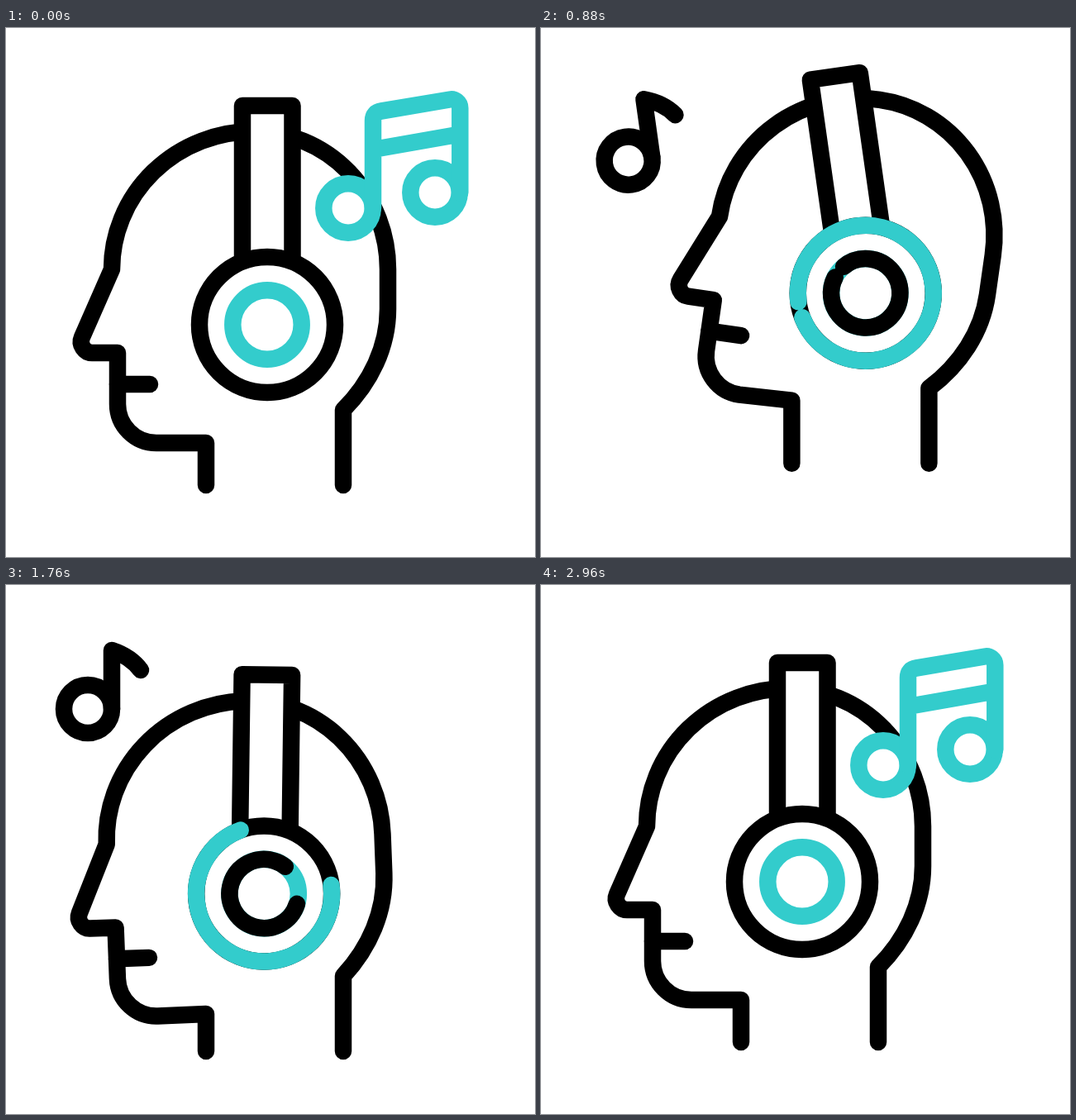
An HTML page with a canvas that plays this animation: 640 by 640 pixels, repeating every 3 s.

```html
<!DOCTYPE html>
<html lang="en">
<head>
<meta charset="utf-8">
<title>Listening to music</title>
<style>
  html, body { margin: 0; width: 100%; height: 100%; overflow: hidden; background: #fff; }
  canvas { display: block; }
</style>
</head>
<body>
<canvas id="stage" width="640" height="640"></canvas>
<script>
const ctx = document.getElementById('stage').getContext('2d');
const LOOP = 3000, BLACK = '#000', TEAL = '#33cccc', WHITE = '#fff';
const RAD = Math.PI / 180;
const NECK = [408, 462], CUP = [316, 359];

// Keys are [time, value...]; values ease in and out between neighbours.
function tween(keys, t) {
  const next = keys.findIndex(key => key[0] > t);
  if (next === 0) return keys[0].slice(1);
  if (next < 0) return keys[keys.length - 1].slice(1);
  const a = keys[next - 1], b = keys[next];
  const s = (t - a[0]) / (b[0] - a[0]), k = s * s * (3 - 2 * s);
  return a.slice(1).map((v, i) => v + (b[i + 1] - v) * k);
}

// dx, dy, head angle, chin corner dy, headphone angle
const REST = [0, 0, 0, 0, 0];
const LEAN = [61.5, -26.4, 8.1, -51.5, -8.1];
const NOD = [0, 30.6, -6.1, 47.8, 2.1];
const POSE = [[150, ...REST], [750, ...LEAN], [870, ...LEAN], [1310, ...NOD],
              [1463, ...NOD], [1963, ...REST]];

function stroke(color) {
  ctx.strokeStyle = color;
  ctx.stroke();
}

function arc(x, y, r, color, from = 0, to = 360) {
  ctx.beginPath();
  ctx.arc(x, y, r, from * RAD, to * RAD);
  stroke(color);
}

function disc(x, y, r, color) {
  ctx.beginPath();
  ctx.arc(x, y, r, 0, 2 * Math.PI);
  ctx.fillStyle = WHITE;
  ctx.fill();
  stroke(color);
}

function drawHead([dx, dy, angle, chinDy]) {
  ctx.save();
  ctx.translate(NECK[0] + dx, NECK[1] + dy);
  ctx.rotate(angle * RAD);
  ctx.translate(-NECK[0], -NECK[1]);

  ctx.beginPath();
  ctx.moveTo(135, 431);
  ctx.lineTo(174, 431);
  stroke(BLACK);

  ctx.beginPath();
  ctx.moveTo(408, 462);
  ctx.bezierCurveTo(441, 429, 462, 386, 462, 340);
  ctx.ellipse(300, 292, 162, 167, 0, 0, -Math.PI / 2, true);
  ctx.ellipse(300, 292, 172, 167, 0, -Math.PI / 2, Math.PI, true);
  ctx.lineTo(92, 374);
  ctx.bezierCurveTo(88, 383, 95, 393, 104, 393);
  ctx.lineTo(135, 393);
  ctx.lineTo(135, 455);
  ctx.bezierCurveTo(135, 481, 156, 502, 182, 502);
  ctx.restore();

  // The neck stays upright while the head turns.
  ctx.lineTo(242 + dx, 502 + chinDy);
  ctx.lineTo(242 + dx, 553 + dy);
  ctx.moveTo(408 + dx, 462 + dy);
  ctx.lineTo(408 + dx, 553 + dy);
  stroke(BLACK);
}

function cupCenter([dx, dy, angle]) {
  const x = CUP[0] - NECK[0], y = CUP[1] - NECK[1];
  const c = Math.cos(angle * RAD), s = Math.sin(angle * RAD);
  return [NECK[0] + dx + x * c - y * s, NECK[1] + dy + x * s + y * c];
}

// An arc sweeps clockwise over each ring, then is wiped in the same direction.
function sweep([x, y], r, color, t, ring) {
  const [span] = tween(ring.span, t);
  if (span <= 0) return;
  if (span >= 360) return arc(x, y, r, color);
  const start = t < 1300 ? ring.tail + 63 * (t - 400) / 480
                         : ring.lead + 34 * (t - 1760) / 320 - span;
  arc(x, y, r, color, start, start + span);
}

const OUTER = { tail: 109.5, lead: 249.6,
                span: [[311, 0], [957, 360], [1522, 360], [2199, 0]] };
const INNER = { tail: 167, lead: 308,
                span: [[341, 0], [978, 360], [1583, 360], [2218, 0]] };

function drawHeadphones(cup, tilt, t) {
  ctx.save();
  ctx.translate(...cup);
  ctx.rotate(tilt * RAD);
  ctx.beginPath();
  ctx.moveTo(-30, -75);
  ctx.lineTo(-30, -265);
  ctx.lineTo(30.5, -265);
  ctx.lineTo(30.5, -75);
  ctx.fillStyle = WHITE;
  ctx.fill();
  stroke(BLACK);
  ctx.restore();

  disc(...cup, 82, BLACK);
  arc(...cup, 41.7, TEAL);
  sweep(cup, 82, TEAL, t, OUTER);
  sweep(cup, 41.7, BLACK, t, INNER);
}

const doubleNote = {
  home: [467, 158], bend: [433, 269],
  travel: [[150, 0], [675, 1], [1850, 1], [2190, 0]],
  turn: [[700, 0], [1800, -5], [2080, -5], [2380, -6], [2900, 0]],
  draw() {
    disc(414, 218, 29.7, TEAL);
    disc(519, 199, 29.7, TEAL);
    ctx.beginPath();
    ctx.moveTo(444, 218);
    ctx.lineTo(444, 112);
    ctx.quadraticCurveTo(444, 102, 454, 100.5);
    ctx.lineTo(537, 86.5);
    ctx.bezierCurveTo(543, 85.5, 549.3, 90, 549.3, 97);
    ctx.lineTo(549.3, 199);
    ctx.moveTo(444, 147);
    ctx.lineTo(549.3, 128.5);
    stroke(TEAL);
  }
};

const singleNote = {
  home: [117, 129], bend: [165, 250],
  travel: [[690, 1], [905, 0], [2130, 0], [2340, 1]],
  turn: [[880, -8], [1040, 5], [1200, 0], [1480, 6], [1760, 0], [2080, -5]],
  draw() {
    disc(99, 150, 29, BLACK);
    ctx.beginPath();
    ctx.moveTo(128, 150);
    ctx.lineTo(128, 79);
    ctx.bezierCurveTo(143, 84, 155, 92, 163, 103);
    stroke(BLACK);
  }
};

// Notes travel on a curve between their home and the ear cup.
function drawNote(note, source, t) {
  const [u] = tween(note.travel, t), [turn] = tween(note.turn, t);
  if (u >= 1) return;
  const v = 1 - u, size = Math.min(1, v * 1.9);
  const at = i => v * v * note.home[i] + 2 * u * v * note.bend[i] + u * u * source[i];
  ctx.save();
  ctx.translate(at(0), at(1));
  ctx.rotate(turn * RAD);
  ctx.scale(size, size);
  ctx.translate(-note.home[0], -note.home[1]);
  note.draw();
  ctx.restore();
}

function render(t) {
  const pose = tween(POSE, t), cup = cupCenter(pose);
  ctx.fillStyle = WHITE;
  ctx.fillRect(0, 0, 640, 640);
  ctx.lineWidth = 20.5;
  ctx.lineCap = ctx.lineJoin = 'round';
  drawHead(pose);
  drawNote(singleNote, cup, t);
  drawNote(doubleNote, CUP, t);
  drawHeadphones(cup, pose[4], t);
}

const began = performance.now();
function frame() {
  render((performance.now() - began) % LOOP);
  requestAnimationFrame(frame);
}
frame();
</script>
</body>
</html>
```
